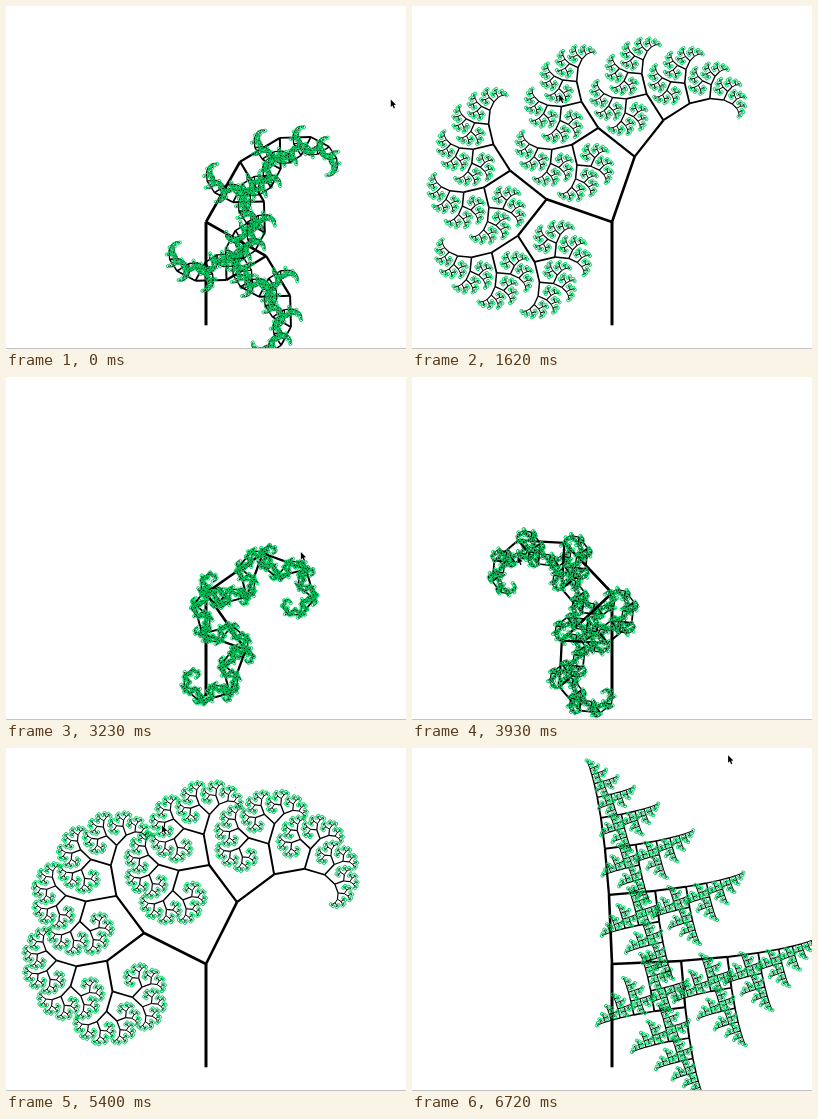
An HTML page with a canvas that plays this animation: 400x343 px, repeating every 6.74 s.

```html
<!DOCTYPE html>
<html lang="en">
<head>
<meta charset="utf-8">
<title>Fractal tree</title>
<style>
  html, body { margin: 0; width: 100%; height: 100%; overflow: hidden; background: #fff; }
  canvas { display: block; }
</style>
</head>
<body>
<canvas id="stage" width="400" height="343"></canvas>
<script>
const ctx = document.getElementById('stage').getContext('2d');
const LOOP = 6740, STEP = 50, DEPTH = 10, RATIO = 0.67, TRUNK = 103.3;
const RAD = Math.PI / 180;

// Lean of the fork in degrees over time: swing left, full turn, swing back, rest, swing right
const SWING = [
  [120, 74.5], [1070, 11.3], [1850, -32], [2220, -17.3], [2920, 72], [3220, 100],
  [3620, 228], [4520, 331.1], [5040, 376], [5370, 341.6], [5750, 315], [6170, 315], [6720, 402.5]
];

// Speed at a key, zero where the swing turns or rests
function speed(i) {
  const a = SWING[i - 1], b = SWING[i], c = SWING[i + 1];
  if (!a || !c || (b[1] - a[1]) * (c[1] - b[1]) <= 0) return 0;
  return (c[1] - a[1]) / (c[0] - a[0]);
}

function leanAt(t) {
  const next = SWING.findIndex(key => key[0] > t);
  if (next === 0) return SWING[0][1];
  if (next < 0) return SWING.at(-1)[1];
  const [t0, a] = SWING[next - 1], [t1, b] = SWING[next];
  const span = t1 - t0, u = (t - t0) / span, v = 1 - u;
  return a + (b - a) * u * u * (3 - 2 * u)
    + u * v * span * (v * speed(next - 1) - u * speed(next));
}

function branch(x, y, length, heading, lean, level) {
  const ex = x + length * Math.sin(heading);
  const ey = y - length * Math.cos(heading);
  ctx.strokeStyle = '#000';
  ctx.lineWidth = Math.max(1, 3 * 0.87 ** level);
  ctx.beginPath();
  ctx.moveTo(x, y);
  ctx.lineTo(ex, ey);
  ctx.stroke();
  if (level === DEPTH) {
    ctx.strokeStyle = '#00d464';
    ctx.lineWidth = 1;
    ctx.beginPath();
    ctx.arc(ex, ey, 1.6, 0, 7);
    ctx.stroke();
    return;
  }
  for (const side of [45, -45]) {
    branch(ex, ey, length * RATIO, heading + (lean + side) * RAD, lean, level + 1);
  }
}

function pointer(x, y) {
  ctx.beginPath();
  ctx.moveTo(x, y);
  ctx.lineTo(x, y + 7.5);
  ctx.lineTo(x + 1.7, y + 6);
  ctx.lineTo(x + 3, y + 9);
  ctx.lineTo(x + 4.2, y + 8.4);
  ctx.lineTo(x + 3, y + 5.6);
  ctx.lineTo(x + 5.2, y + 5.4);
  ctx.closePath();
  ctx.strokeStyle = '#fff';
  ctx.lineWidth = 1;
  ctx.stroke();
  ctx.fillStyle = '#000';
  ctx.fill();
}

function draw(now) {
  // The picture advances in steps
  const t = Math.max(0, 20 + STEP * Math.floor((now % LOOP - 20) / STEP));
  const lean = leanAt(t);
  ctx.fillStyle = '#fff';
  ctx.fillRect(0, 0, 400, 343);
  branch(200, 319.3, TRUNK, 0, lean, 0);
  ctx.fillStyle = '#c4c4c4';
  ctx.fillRect(0, 342, 400, 1);

  // The pointer circles with the lean, reaching far out around the loop's seam
  const reach = 95 + 105 * Math.cos(Math.PI * t / LOOP) ** 12;
  const angle = (lean - 7) * RAD;
  pointer(200 + reach * Math.sin(angle), 170 - reach * Math.cos(angle));
}

let origin;
function tick(now) {
  origin ??= now;
  draw(now - origin);
  requestAnimationFrame(tick);
}
draw(0);
requestAnimationFrame(tick);
</script>
</body>
</html>
```
